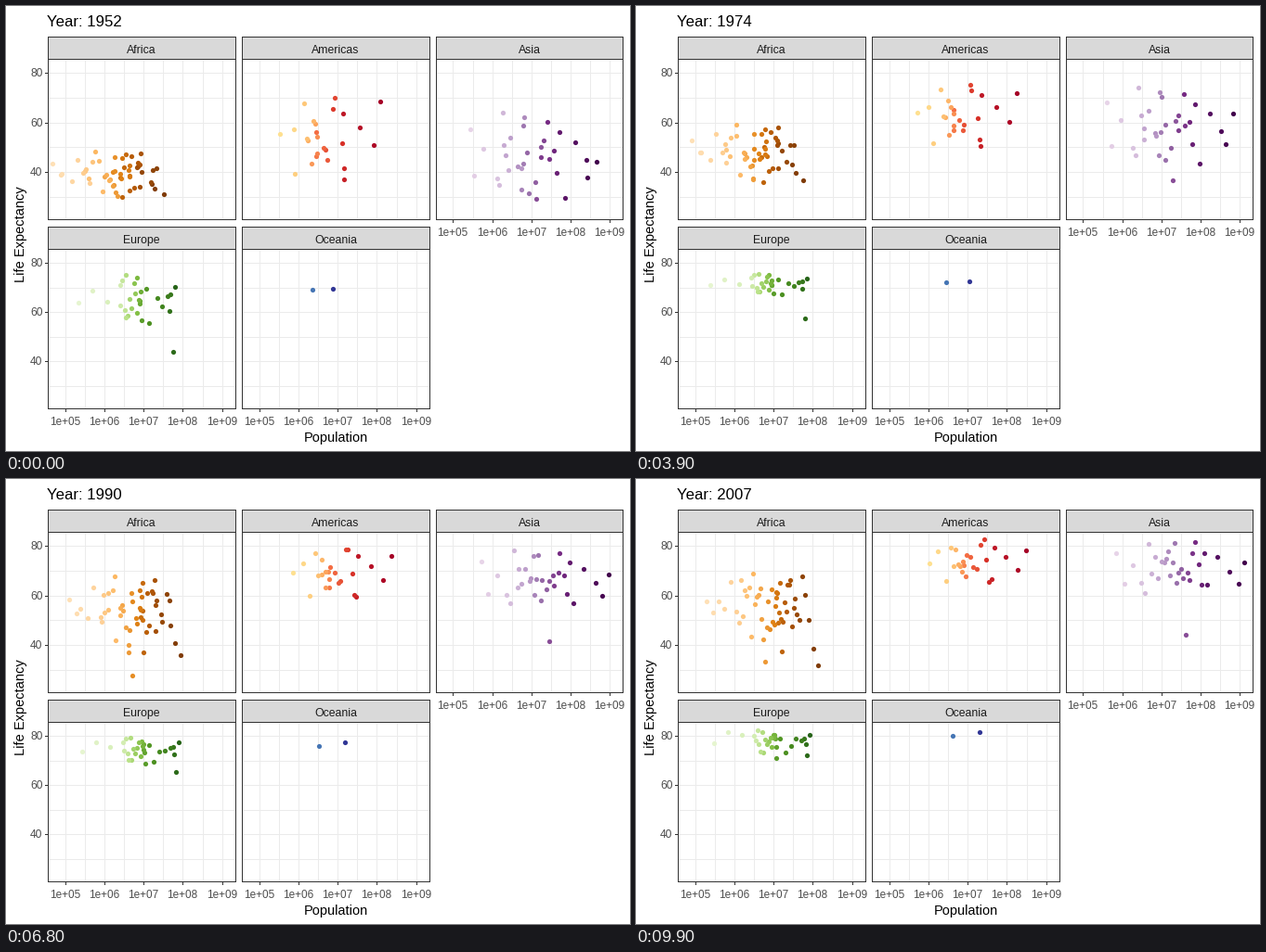
A matplotlib script for the animation above (10 s loop, 672 px wide and 480 px high).

```python
import matplotlib.pyplot as plt
import numpy as np
from matplotlib.animation import FuncAnimation
from matplotlib.colors import LinearSegmentedColormap
from matplotlib.patches import Rectangle

W, H, DPI = 672, 480, 100
FRAMES, STEP = 100, 9               # nine frames from one survey to the next
SURVEYS = np.arange(1952, 2008, 5)
KEY_YEARS = [1952, 1962, 1972, 1982, 1992, 2007]
RANKS = [0, .04, .12, .3, .5, .7, .9, 1]    # share of countries that are larger
X_RANGE, Y_RANGE = (4.561, 9.337), (20.65, 85.55)

rng = np.random.default_rng(7)
plt.rcParams["font.family"] = "Liberation Sans"
px = 72 / DPI
fig = plt.figure(figsize=(W / DPI, H / DPI), dpi=DPI, facecolor="white")
ax = fig.add_axes([0, 0, 1, 1])
ax.set(xlim=(0, W), ylim=(H, 0))
ax.axis("off")


def shuffled_scores(n):
    """Evenly graded scores around zero, denser in the middle, in random order."""
    v = np.linspace(-1, 1, n)
    return rng.permutation(v * (1.2 + .75 * v * v))[:, None]


class Panel:
    def __init__(self, name, cell, ramp, n, log_pops, growth, mean, spread,
                 landmarks=None):
        """log_pops: final sizes at RANKS; mean, spread: life at KEY_YEARS."""
        self.name = name
        self.left, self.right, self.strip, self.top, self.bottom = cell
        rank = np.linspace(0, 1, n)
        cmap = LinearSegmentedColormap.from_list(name, ramp, N=1024)
        self.colors = cmap(rank)

        span = (SURVEYS - 1952) / 55
        rate = growth * (1 + .3 * rng.uniform(-1, 1, (n, 1)))
        self.pops = np.interp(rank, RANKS, log_pops)[:, None] - rate * (1 - span)

        early, change = shuffled_scores(n), shuffled_scores(n)
        late = .8 * early + .55 * change
        score = early + (late - early) * span ** 2
        self.lives = self.over_time(mean) + score * self.over_time(spread)
        for k, life in (landmarks or {}).items():
            self.lives[k] = self.over_time(life)

    @staticmethod
    def over_time(values):
        return np.interp(SURVEYS, KEY_YEARS, values)

    def x(self, v):
        a, b = X_RANGE
        return self.left + .5 + (v - a) / (b - a) * (self.right - self.left)

    def y(self, v):
        a, b = Y_RANGE
        return self.bottom + .5 - (v - a) / (b - a) * (self.bottom - self.top)


COLS = [(45, 247), (254, 456), (463, 664)]
ROWS = [(33, 57, 230), (238, 262, 434)]

africa = Panel(
    "Africa", COLS[0] + ROWS[0],
    ["#7F3B08", "#B35806", "#E08214", "#FDB863", "#FEE0B6"], 52,
    [8.13, 7.88, 7.58, 7.23, 7.0, 6.59, 6.07, 5.3], .58,
    mean=[39.1, 43.3, 47.5, 51.6, 53.8, 54.9],
    spread=[4.9, 5.5, 6.2, 7.2, 9, 9.6],
    landmarks={28: [40, 43, 44.6, 46.2, 23.6, 46.2]})
americas = Panel(
    "Americas", COLS[1] + ROWS[0],
    ["#A50026", "#D73027", "#F46D43", "#FDAE61", "#FEE090"], 25,
    [8.48, 8.28, 7.68, 7.4, 6.97, 6.83, 6.53, 6.02], .42,
    mean=[53.3, 58.4, 62.4, 66.2, 69.6, 73.6],
    spread=[8.4, 7.4, 6.5, 6, 4.9, 4],
    landmarks={0: [68.4, 70.2, 71.3, 74.7, 76.1, 78.2]})
asia = Panel(
    "Asia", COLS[2] + ROWS[0],
    ["#40004B", "#762A83", "#9970AB", "#C2A5CF", "#E7D4E8"], 33,
    [9.12, 8.95, 8.19, 7.75, 7.39, 7.05, 6.52, 5.85], .45,
    mean=[46.5, 52, 57.9, 63.4, 67.5, 71.4],
    spread=[8.8, 8.8, 8.4, 7, 6.2, 6],
    landmarks={0: [44, 44.5, 63.1, 65.5, 68.7, 73],
               1: [37.4, 43.6, 50.7, 56.6, 60.2, 64.7],
               12: [28.8, 32, 36.1, 39.9, 41.7, 43.8]})
europe = Panel(
    "Europe", COLS[0] + ROWS[1],
    ["#276419", "#4D9221", "#7FBC41", "#B8E186", "#E6F5D0"], 30,
    [7.92, 7.84, 7.77, 7.08, 6.98, 6.73, 6.5, 5.48], .13,
    mean=[65.1, 69, 71.3, 73.2, 74.7, 77.8],
    spread=[5, 3, 2.2, 2.5, 2.9, 2.8],
    landmarks={1: [43.6, 52.1, 57, 61, 66.1, 71.8]})
oceania = Panel(
    "Oceania", COLS[1] + ROWS[1], ["#313695", "#4575B4"], 2,
    np.interp(RANKS, [0, 1], [7.31, 6.61]), .34,
    mean=[69.3, 71.1, 71.9, 74.3, 77, 80.7],
    spread=[.1, .1, .1, .2, .3, .3])
panels = [africa, americas, asia, europe, oceania]


def crisp(v):
    return np.floor(v) + .5


def line(x0, y0, x1, y1, color, z):
    ax.plot([x0, x1], [y0, y1], color=color, lw=px, aa=False, snap=False,
            zorder=z, solid_capstyle="butt")


def box(x0, y0, x1, y1, fill, z):
    ax.add_patch(Rectangle((x0 + .5, y0 + .5), x1 - x0, y1 - y0, fc=fill,
                           ec="#333333", lw=px, aa=False, snap=False, zorder=z))


def label(x, y, s, size, color="black", ha="center", rotation=0):
    return ax.text(x, y, s, size=size * px, color=color, ha=ha, va="baseline",
                   rotation=rotation, rotation_mode="anchor", zorder=6)


def draw_panel(p):
    for v in np.arange(5, 9.1, .5):
        x = crisp(p.x(v))
        line(x, p.top, x, p.bottom, "#EBEBEB", 1)
    for v in range(30, 81, 10):
        y = crisp(p.y(v) + .5)
        line(p.left, y, p.right, y, "#EBEBEB", 1)
    box(p.left, p.top, p.right, p.bottom, "none", 4)
    box(p.left, p.strip, p.right, p.top, "#D9D9D9", 4)
    label((p.left + p.right) / 2, p.strip + 18, p.name, 12.2, "#1A1A1A")
    if p in (africa, europe):
        for v in (40, 60, 80):
            y = crisp(p.y(v) + .5)
            line(42, y, 45, y, "#333333", 4)
            label(39.5, y + 3.8, str(v), 12, "#4D4D4D", "right")
    if p not in (africa, americas):
        for k in range(5, 10):
            x = crisp(p.x(k))
            line(x, p.bottom + 1, x, p.bottom + 4, "#333333", 4)
            label(x - .7, p.bottom + 17.5, f"1e+0{k}", 11.7, "#4D4D4D")


for panel in panels:
    draw_panel(panel)
label(355, 470, "Population", 14.5)
label(20, 246.5, "Life Expectancy", 14.6, rotation=90)
title = label(44, 22, "", 16.8, ha="left")

xs = np.vstack([p.x(p.pops) for p in panels])
ys = np.vstack([p.y(p.lives) for p in panels])
dots = ax.scatter(xs[:, 0], ys[:, 0], s=(5.2 * px) ** 2, linewidths=0, zorder=3,
                  c=np.vstack([p.colors for p in panels]), snap=False)


def ease(t):
    """Cubic in and out."""
    return 4 * t ** 3 if t < .5 else 1 - 4 * (1 - t) ** 3


def update(i):
    k = min(i // STEP, len(SURVEYS) - 2)
    t = ease(i / STEP - k)
    x = xs[:, k] + (xs[:, k + 1] - xs[:, k]) * t
    y = ys[:, k] + (ys[:, k + 1] - ys[:, k]) * t
    dots.set_offsets(np.column_stack([crisp(x), crisp(y)]))
    title.set_text(f"Year: {round(1952 + 55 * i / (FRAMES - 1))}")
    return dots, title


anim = FuncAnimation(fig, update, frames=FRAMES, interval=100, repeat=True,
                     repeat_delay=0, blit=False)
plt.show()
```
